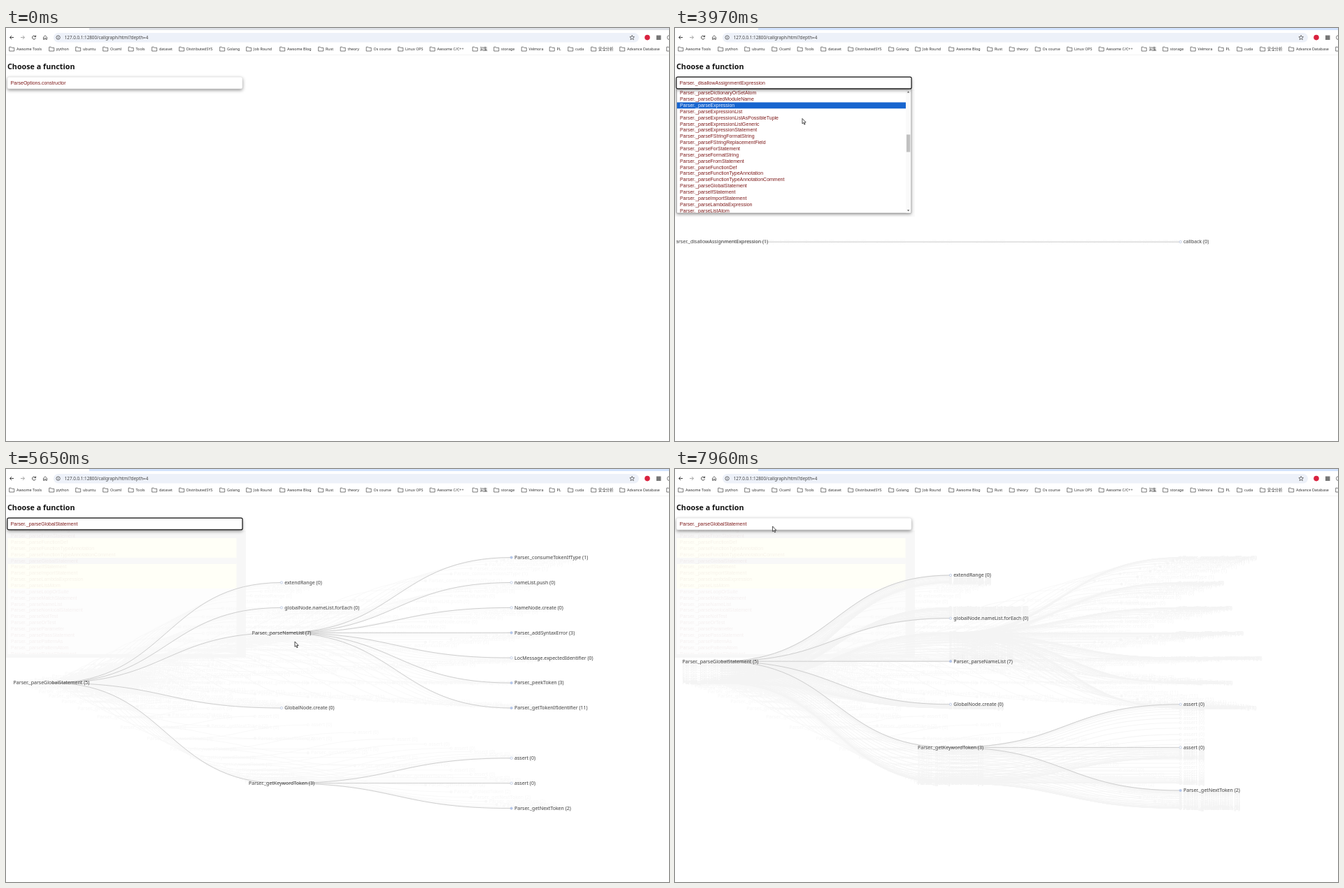
An HTML page with a canvas for the animation above (7.99 s loop, 948x591 px).

```html
<!DOCTYPE html>
<html lang="en">
<head>
<meta charset="utf-8">
<title>Call graph</title>
<style>
  html, body { margin: 0; width: 100%; height: 100%; overflow: hidden; background: #fff; }
  canvas { display: block; }
</style>
</head>
<body>
<canvas id="stage" width="948" height="591"></canvas>
<script>
const ctx = document.getElementById('stage').getContext('2d');
const LOOP = 7990;
const SANS = '"Noto Sans", "Open Sans", "Noto Sans CJK SC", sans-serif';
const ARIAL = '"Liberation Sans", Arial, sans-serif';

// ---- timing helpers ----
const clamp = v => Math.max(0, Math.min(1, v));
const mix = (a, b, k) => a + (b - a) * k;
const cubicInOut = k => k < .5 ? 4 * k ** 3 : 1 - 4 * (1 - k) ** 3;
const cubicOut = k => 1 - (1 - k) ** 3;
const smooth = k => k * k * (3 - 2 * k);
const ramp = (t, start, length, ease) => ease(clamp((t - start) / length));

// Keys are [time, ...values]; returns the values at time t.
function track(keys, t, ease = k => k) {
  let i = 0;
  while (i < keys.length - 2 && t >= keys[i + 1][0]) i++;
  const [a, b] = [keys[i], keys[i + 1]];
  const k = ramp(t, a[0], b[0] - a[0], ease);
  return a.slice(1).map((v, n) => mix(v, b[n + 1], k));
}

// ---- drawing helpers ----
function text(str, x, y, font, color, align = 'left') {
  ctx.font = font;
  ctx.fillStyle = color;
  ctx.textAlign = align;
  ctx.fillText(str, x, y);
}
function rect(x, y, w, h, color) {
  ctx.fillStyle = color;
  ctx.fillRect(x, y, w, h);
}
function shape(d, fill, stroke, width = 1, x = 0, y = 0) {
  const path = typeof d === 'string' ? new Path2D(d) : d;
  ctx.save();
  ctx.translate(x, y);
  if (fill) { ctx.fillStyle = fill; ctx.fill(path); }
  if (stroke) { ctx.strokeStyle = stroke; ctx.lineWidth = width; ctx.stroke(path); }
  ctx.restore();
}
function rounded(x, y, w, h, r) {
  const path = new Path2D();
  path.roundRect(x, y, w, h, r);
  return path;
}
function circle(x, y, r, fill, stroke, width) {
  const path = new Path2D();
  path.arc(x, y, r, 0, 7);
  shape(path, fill, stroke, width);
}
function shadowed(path, fill, blur, dy, color) {
  ctx.save();
  Object.assign(ctx, { shadowBlur: blur, shadowOffsetY: dy, shadowColor: color });
  shape(path, fill);
  ctx.restore();
}

// ---- browser frame ----
const BOOKMARKS = [[15, 'Awsome Tools'], [72, 'python'], [110, 'ubuntu'], [149, 'Ocaml'], [185.5, 'Tools'],
  [219, 'dataset'], [258, 'DistributedSYS'], [316, 'Golang'], [354, 'Job Round'], [402, 'Awsome Blog'],
  [457, 'Rust'], [488.5, 'theory'], [525.5, 'Os course'], [571, 'Linux OPS'], [616.5, 'Awsome C/C++'],
  [677.5, '润集'], [708, 'storage'], [747.5, 'Velmora'], [787.5, 'PL'], [814, 'cuda'], [847, '安全分析'],
  [888, 'Advance Database'], [955, '']];

function drawBrowser(active) {
  rect(0, 0, 948, 591, '#fff');
  rect(119, 0, 829, 3, active ? '#d3e3fd' : '#dee1e6');
  shape(rounded(68, 7, 837, 13.5, 6.7), '#edf1f9');
  shape('M11 13.5H5.5M8 11L5.5 13.5L8 16', null, '#444', 1);
  shape('M21 13.5H26.5M24 11L26.5 13.5L24 16', null, '#aaa', 1);
  shape('M42.2 12.3A2.5 2.5 0 1 0 42.4 14.5M42.6 10.6V12.6H40.4', null, '#444', 1);
  shape('M53.5 13L56 10.8L58.5 13V16.3H56.8V14.3H55.2V16.3H53.5Z', null, '#444', .8);
  circle(74.6, 13.6, 2.7, null, '#444', .8);
  shape('M74.6 13.2V15.2M74.6 11.7V12.4', null, '#444', .7);
  text('127.0.0.1:12800/callgraph/html?depth=4', 83.7, 15.9, '6.3px ' + SANS, '#444');
  shape('M895.2 10.3L896.1 12.5L898.5 12.7L896.7 14.3L897.3 16.7L895.2 15.4L893.1 16.7L893.7 14.3L891.9 12.7L894.3 12.5Z',
    null, '#444', .7);
  circle(917, 13.6, 3.8, '#d9223f');
  rect(930, 10.5, 6.5, 6.5, '#777');
  circle(948.5, 13.6, 3, null, '#777', 1);
  for (const [x, label] of BOOKMARKS) {
    shape('M0 0H2.5L3.4 1H7V5.8H0Z', null, '#444', .7, x - 10.3, 27.2);
    text(label, x, 32, '5.4px ' + SANS, '#333');
  }
  rect(0, 38, 948, 1, '#f4f4f4');
  text('Choose a function', 2, 58.8, 'bold 10.75px "Open Sans", "Noto Sans", sans-serif', '#111');
}

// ---- function list ----
const METHODS = `addSyntaxError atEof consumeTokenIfKeyword consumeTokenIfOperator consumeTokenIfType
  consumeTokensUntilType createBinaryOperation createUnaryOperation disallowAssignmentExpression getKeywordToken
  getLanguageVersion getNextToken getTokenIfIdentifier getTokenIfType getRangeText getTypeAnnotationCommentText
  handleExpressionParseError isNextTokenNeverExpression isParsingTypeAnnotation isParsingFormatString isTypingImport
  parseAndTest parseArgList parseArgument parseArithmeticExpression parseArithmeticFactor parseArithmeticTerm
  parseAssertStatement parseAssignmentExpression parseAsyncStatement parseAtom parseAtomExpression parseBitwiseAnd
  parseBitwiseOr parseBitwiseXor parseBreakStatement parseCaseStatement parseChainAssignments parseClassDef
  parseComparison parseCompForStatement parseContinueStatement parseDecorated parseDecorator parseDelStatement
  parseDictionaryOrSetAtom parseDottedModuleName parseExpression parseExpressionList
  parseExpressionListAsPossibleTuple parseExpressionListGeneric parseExpressionStatement parseFStringFormatString
  parseFStringReplacementField parseForStatement parseFormatString parseFromStatement parseFunctionDef
  parseFunctionTypeAnnotation parseFunctionTypeAnnotationComment parseGlobalStatement parseIfStatement
  parseImportStatement parseLambdaExpression parseListAtom parseLoopOrSuite parseMatchStatement parseNameList
  parseNonlocalStatement parseNotTest parseOrTest parseParameter parsePassStatement parsePatternAs
  parsePatternAtom parseRaiseStatement parseReturnStatement parseStatement parseSubscriptList`;
const OPTIONS = ['ParseOptions.constructor', ...METHODS.split(/\s+/).map(name => 'Parser._' + name)];
const indexOf = name => OPTIONS.indexOf('Parser._' + name);
const FIRST = indexOf('disallowAssignmentExpression');
const SECOND = indexOf('parseGlobalStatement');
const ROW = 8.87, ROW_TOP = 91.6, TOTAL_ROWS = 130;
const PICK_1 = 1870, PICK_2 = 4170, CLICK = 6430;

const midway = indexOf('parseExpression') - 2.22;
const SCROLL = [[3730, 0], [3940, midway - 1.9], [3970, midway], [4130, SECOND - 4.48]];
const scrollAt = t => track(SCROLL, t)[0];
const selectedAt = t => t < PICK_1 ? 0 : t < PICK_2 ? FIRST : SECOND;

// The highlight trails the pointer slightly.
function highlightAt(t) {
  const y = cursorAt(t - 30)[1];
  return y < 87 ? selectedAt(t) : Math.floor(scrollAt(t - 30) + (y - ROW_TOP) / ROW + .55);
}

function drawRows(scroll, highlight) {
  ctx.save();
  ctx.beginPath();
  ctx.rect(2.5, 87.5, 328, 177);
  ctx.clip();
  for (let i = Math.max(0, Math.floor(scroll) - 1); i < scroll + 21 && i < OPTIONS.length; i++) {
    const y = ROW_TOP + (i - scroll) * ROW;
    if (i === highlight) rect(2.5, y - 4.3, 327.5, ROW, '#1765cf');
    text(OPTIONS[i], 7, y + 2.2, '7px ' + ARIAL, i === highlight ? '#e8eefc' : '#7d1a1a');
  }
  ctx.restore();
}

function drawDropdown(t) {
  const scroll = scrollAt(t);
  const box = rounded(2.3, 87, 335.4, 178, 1);
  shadowed(box, '#fff', 4, 1.5, 'rgba(0,0,0,.4)');
  shape(box, null, '#888', .7);
  drawRows(scroll, highlightAt(t));
  rect(330.3, 87.5, 7, 177, '#fafafa');
  rect(331, 95 + scroll * 163 / TOTAL_ROWS, 5.3, 25, '#c1c1c1');
  shape('M332 92.5L333.6 90.5L335.2 92.5Z', '#555');
  shape('M332 260.3L333.6 262.3L335.2 260.3Z', '#555');
}

function drawSelect(t) {
  const box = rounded(1.9, 70.1, 336.2, 16.8, 2);
  const focused = t >= 900 && t < CLICK;
  shadowed(box, '#fff', 5, 2, 'rgba(0,0,0,.45)');
  shape(box, null, focused ? '#111' : '#ddd', focused ? 1.2 : .6);
  text(OPTIONS[selectedAt(t)], 6.6, 80.9, '7px ' + ARIAL, '#7d1a1a');
}

// Pale residue of the closed list.
function drawListResidue(scroll, selected, strength) {
  const bandY = ROW_TOP + (selected - scroll) * ROW - 4.3;
  rect(0, 88, 343, 182, `rgba(0,0,0,${strength})`);
  rect(2.5, 99, 327, 72, '#fffff7');
  rect(2.5, 171, 327, 94, '#fdfdfd');
  rect(2.5, bandY, 327, ROW, '#f8f8f8');
  ctx.globalAlpha = strength * 2;
  drawRows(scroll, -1);
  ctx.globalAlpha = 1;
}

// ---- call tree ----
// Nodes: [label, level, row, parent, row after folding]
const FOLDING = 3;
const SMALL_TREE = [['Parser._disallowAssignmentExpression (1)', 0, 5], ['callback (0)', 2, 5, 0]];
const LARGE_TREE = [
  ['Parser._parseGlobalStatement (5)', 0, 5, , 2],
  ['extendRange (0)', 1, 1, 0, 0],
  ['globalNode.nameList.forEach (0)', 1, 2, 0, 1],
  ['Parser._parseNameList (7)', 1, 3, 0, 2],
  ['GlobalNode.create (0)', 1, 6, 0, 3],
  ['Parser._getKeywordToken (3)', 1, 9, 0, 4],
  ...['Parser._consumeTokenIfType (1)', 'nameList.push (0)', 'NameNode.create (0)', 'Parser._addSyntaxError (3)',
    'LocMessage.expectedIdentifier (0)', 'Parser._peekToken (3)', 'Parser._getTokenIfIdentifier (11)']
    .map((label, i) => [label, 2, i, FOLDING, 2]),
  ['assert (0)', 2, 8, 5, 3],
  ['assert (0)', 2, 9, 5, 4],
  ['Parser._getNextToken (2)', 2, 10, 5, 5],
];
const LEVEL_X = [65, 394, 722.7];
const rowY = row => 126.6 + 35.9 * row;
const GROW_1 = 2254, GROW_2 = 4290, FOLD = 6440, MOVE = 750, TICK = 30;
const INK = { label: '#444', edge: '#c4c4c4', ring: '#b0c0e0', dot: '#b0c4ee' };
const tint = color => ({ label: color, edge: color, ring: color, dot: color });

function drawTree(nodes, grow, fold, dim, ink) {
  const rootY = rowY(5);
  const placed = nodes.map(([label, level, row, parent, foldedRow], i) => {
    const removed = parent === FOLDING;
    const x = mix(LEVEL_X[level], LEVEL_X[removed ? 1 : level], fold);
    const y = fold ? mix(rowY(row), 152 + 61.6 * foldedRow, fold) : rowY(row);
    return {
      label, parent,
      x: mix(LEVEL_X[0], x, grow),
      y: mix(rootY, y, grow),
      alpha: removed ? 1 - fold : i === FOLDING ? 1 : dim,
      edgeAlpha: removed ? 1 - fold : dim,
      open: nodes.some(n => n[3] === i) && !(i === FOLDING && fold > 0),
    };
  });
  ctx.save();
  ctx.beginPath();
  ctx.rect(2, 88, 946, 503);
  ctx.clip();
  for (const node of placed) {
    const from = placed[node.parent];
    if (!from) continue;
    const mid = (from.x + node.x) / 2;
    ctx.globalAlpha = node.edgeAlpha;
    shape(`M${from.x} ${from.y}C${mid} ${from.y} ${mid} ${node.y} ${node.x} ${node.y}`, null, ink.edge, .8);
  }
  for (const { label, x, y, alpha, open } of placed) {
    ctx.globalAlpha = alpha;
    if (!open) circle(x, y, 1.6, label.endsWith('(0)') ? '#fff' : ink.dot, ink.ring, .7);
    text(label, open ? x : x + 4.3, y + 2.3, '7px ' + SANS, ink.label, open ? 'center' : 'left');
  }
  ctx.restore();
}

// Pale marks left along the way; darkening keeps overlaps from piling up.
function drawTrail(elapsed, drawAt) {
  ctx.globalCompositeOperation = 'darken';
  for (let s = TICK; s < Math.min(elapsed, MOVE); s += TICK) drawAt(cubicInOut(s / MOVE));
  ctx.globalCompositeOperation = 'source-over';
}

function drawGraph(t) {
  if (t < GROW_1) return;
  const large = t >= GROW_2;
  const nodes = large ? LARGE_TREE : SMALL_TREE;
  const start = large ? GROW_2 : GROW_1;
  const grow = ramp(t, start, MOVE, cubicInOut);
  const fold = ramp(t, FOLD, MOVE, cubicInOut);
  const blur = ramp(t, 5700, 300, cubicOut) - ramp(t, 7130, 300, cubicOut);
  drawTrail(t - start, p => drawTree(nodes, p, 0, 1, tint('#f8f8f8')));
  drawTrail(t - FOLD, p => drawTree(nodes, 1, p, 1, tint('#f4f4f4')));
  drawTree(nodes, grow, fold, 1 - .93 * blur, INK);
}

function drawTooltip(t) {
  const alpha = ramp(t, 5720, 200, cubicOut) - ramp(t, 7200, 200, cubicOut);
  if (alpha <= 0) return;
  const [cx, cy] = cursorAt(Math.min(t, 7130));
  const [x, y] = [cx + 9, cy + 5.5];
  const box = rounded(x, y, 175.5, 15.5, 2);
  ctx.globalAlpha = alpha;
  shadowed(box, '#fff', 4, 1, 'rgba(0,0,0,.2)');
  shape(box, null, '#aaa', .6);
  text('Parser._parseGlobalStatement.Parser._parseNameList', x + 4.6, y + 9.9, '6.05px ' + SANS, '#666');
  text('7', x + 167, y + 9.9, 'bold 6.05px ' + SANS, '#666');
  ctx.globalAlpha = 1;
}

// ---- pointer ----
const CURSOR = [[100, 936, 20], [310, 936, 20], [800, 138, 79], [1300, 137, 78], [1540, 137, 78], [1800, 180, 167],
  [2950, 180, 166.8], [3100, 178, 142], [3430, 150, 80], [3730, 150, 80], [3900, 182, 129.5], [3970, 182, 129.5],
  [4110, 177.7, 135], [5230, 177.7, 136], [5650, 413, 247], [5950, 431, 239.5], [6970, 431, 239.5],
  [7130, 455, 284], [7630, 149, 95], [7780, 138, 83], [7930, 138, 83], [7960, 139.6, 82]];
const cursorAt = t => track(CURSOR, t, smooth);

function drawCursor(t) {
  if (t < 100) return;
  const [x, y] = cursorAt(t);
  shape('M0 0V7.4L1.7 5.9L2.9 8.7L4.1 8.2L2.9 5.5H5.2Z', '#fff', '#222', .8, x, y);
}

function draw() {
  const t = performance.now() % LOOP;
  const open = (t >= 910 && t < PICK_1) || (t >= 3490 && t < PICK_2);
  drawBrowser(t >= 900);
  if (t >= PICK_2) drawListResidue(SECOND - 4.48, SECOND, .03);
  else if (t >= PICK_1) drawListResidue(0, FIRST, .02);
  drawGraph(t);
  if (open) drawDropdown(t);
  drawSelect(t);
  drawTooltip(t);
  drawCursor(t);
  requestAnimationFrame(draw);
}
draw();
</script>
</body>
</html>
```
